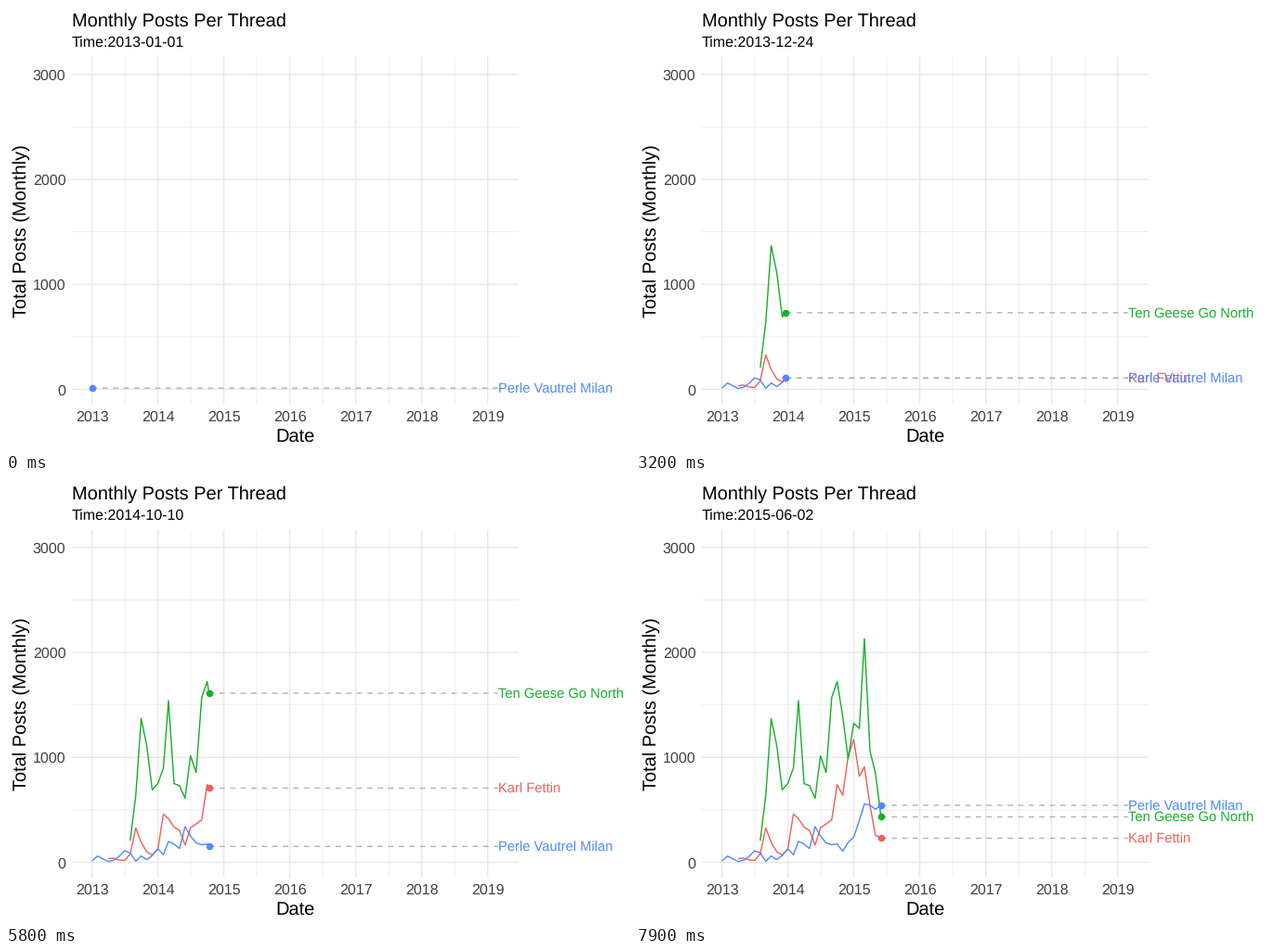
A matplotlib script for the animation above (8000 ms loop, 672x480 px).

```python
import numpy as np
import matplotlib.pyplot as plt
from matplotlib.animation import FuncAnimation

plt.rcParams["font.family"] = "Liberation Sans"
plt.rcParams["text.hinting"] = "none"

W, H, DPI = 672, 480, 96
PX = 72 / DPI                      # one pixel in points
FRAMES, INTERVAL = 80, 100
DAYS_PER_FRAME = 2222 / 199
LEFT, RIGHT, TOP, BOTTOM = 70.6, 552.2, 54.5, 430.2
GRID, TICK, DASH = "#E8E8E8", "#404040", "#B3B3B3"
START = np.datetime64("2013-01-01")


def day(date):
    return (np.asarray(date, dtype="datetime64[D]") - START).astype(int)


def px(days):
    return 92.5 + 0.19453 * np.asarray(days)


def py(value):
    return 413.5 - 0.11325 * np.asarray(value)


X_LABEL = float(px(day("2019-03-01")))

fig = plt.figure(figsize=(W / DPI, H / DPI), dpi=DPI, facecolor="white")
ax = fig.add_axes([0, 0, 1, 1])
ax.set_xlim(0, W)
ax.set_ylim(H, 0)
ax.axis("off")


def line(xs, ys, color, width=1.42, **kw):
    return ax.plot(xs, ys, color=color, lw=width * PX, snap=False,
                   solid_capstyle="butt", solid_joinstyle="round", **kw)[0]


def text(x, y, s, size, color="black", **kw):
    return ax.text(x, y, s, fontsize=size * PX, color=color,
                   va="baseline", rotation_mode="anchor", **kw)


def vline(x, width):
    line([x, x], [TOP, BOTTOM], GRID, width, zorder=1)


def hline(y, width):
    line([LEFT, RIGHT], [y, y], GRID, width, zorder=1)


# Panel grid and axes
years = [str(y) for y in range(2013, 2020)]
year_x = [float(px(day(y + "-01-01"))) for y in years]
for a, b in zip(year_x, year_x[1:]):
    vline((a + b) / 2, 0.71)
for v in (500, 1500, 2500):
    hline(float(py(v)), 0.71)
for x, label in zip(year_x, years):
    vline(x, 1.42)
    text(x, 448, label, 16, TICK, ha="center")
for v in range(0, 3001, 1000):
    hline(float(py(v)), 1.42)
    text(64.5, float(py(v)) + 6, str(v), 16, TICK, ha="right")

text(71, 22, "Monthly Posts Per Thread", 20)
clock = text(71, 44, "", 16)
text(311.5, 470, "Date", 20, ha="center")
text(22, 242.5, "Total Posts (Monthly)", 20, ha="center", rotation=90)


class Series:
    """Monthly counts revealed along time, with a tracking dot and label."""

    def __init__(self, order, name, color, first, values):
        months = np.datetime64(first, "M") + np.arange(len(values))
        self.days = day(months)
        self.values = np.array(values, float)
        self.keys = np.round(self.days / DAYS_PER_FRAME)
        self.name = name
        z = order / 10
        self.path = line([], [], color, zorder=2 + z)
        self.lead = line([], [], DASH, zorder=3 + z, ls="--",
                         dashes=(4, 4), dash_capstyle="butt")
        self.dot = ax.plot([], [], "o", color=color, ms=7.6 * PX, mew=0,
                           snap=False, zorder=4 + z)[0]
        self.label = text(X_LABEL, 0, "", 14.7, color, zorder=5 + z)

    def show(self, i):
        if i < self.keys[0]:
            for artist in (self.path, self.lead, self.dot):
                artist.set_data([], [])
            self.label.set_text("")
            return
        x = float(px(np.interp(i, self.keys, self.days)))
        y = float(py(np.interp(i, self.keys, self.values)))
        past = self.keys < i
        self.path.set_data(np.append(px(self.days[past]), x),
                           np.append(py(self.values[past]), y))
        self.lead.set_data([x, X_LABEL], [y, y])
        self.dot.set_data([x], [y])
        self.label.set_text(self.name)
        self.label.set_y(y + 5.8)


series = [
    Series(0, "Karl Fettin", "#F0605A", "2013-04",
           [35, 40, 22, 18, 80, 328, 190, 100, 70,
            125, 460, 415, 335, 305, 165, 330, 365, 405, 740, 640, 1010,
            1170, 820, 910, 540, 257, 230]),
    Series(1, "Ten Geese Go North", "#18B02B", "2013-08",
           [205, 640, 1370, 1110, 690,
            750, 900, 1540, 750, 730, 610, 1015, 855, 1570, 1722, 1390, 985,
            1325, 1275, 2130, 1060, 850, 433]),
    Series(2, "Perle Vautrel Milan", "#5189FF", "2013-01",
           [12, 60, 35, 8, 20, 57, 110, 90, 10, 61, 26, 65,
            130, 72, 200, 175, 131, 340, 250, 185, 168, 175, 105, 190,
            240, 400, 556, 546, 506, 543]),
]


def update(i):
    clock.set_text(f"Time:{START + int(i * DAYS_PER_FRAME)}")
    for s in series:
        s.show(i)
    return []


anim = FuncAnimation(fig, update, frames=FRAMES, interval=INTERVAL,
                     repeat=True, repeat_delay=0, blit=False)
plt.show()
```
